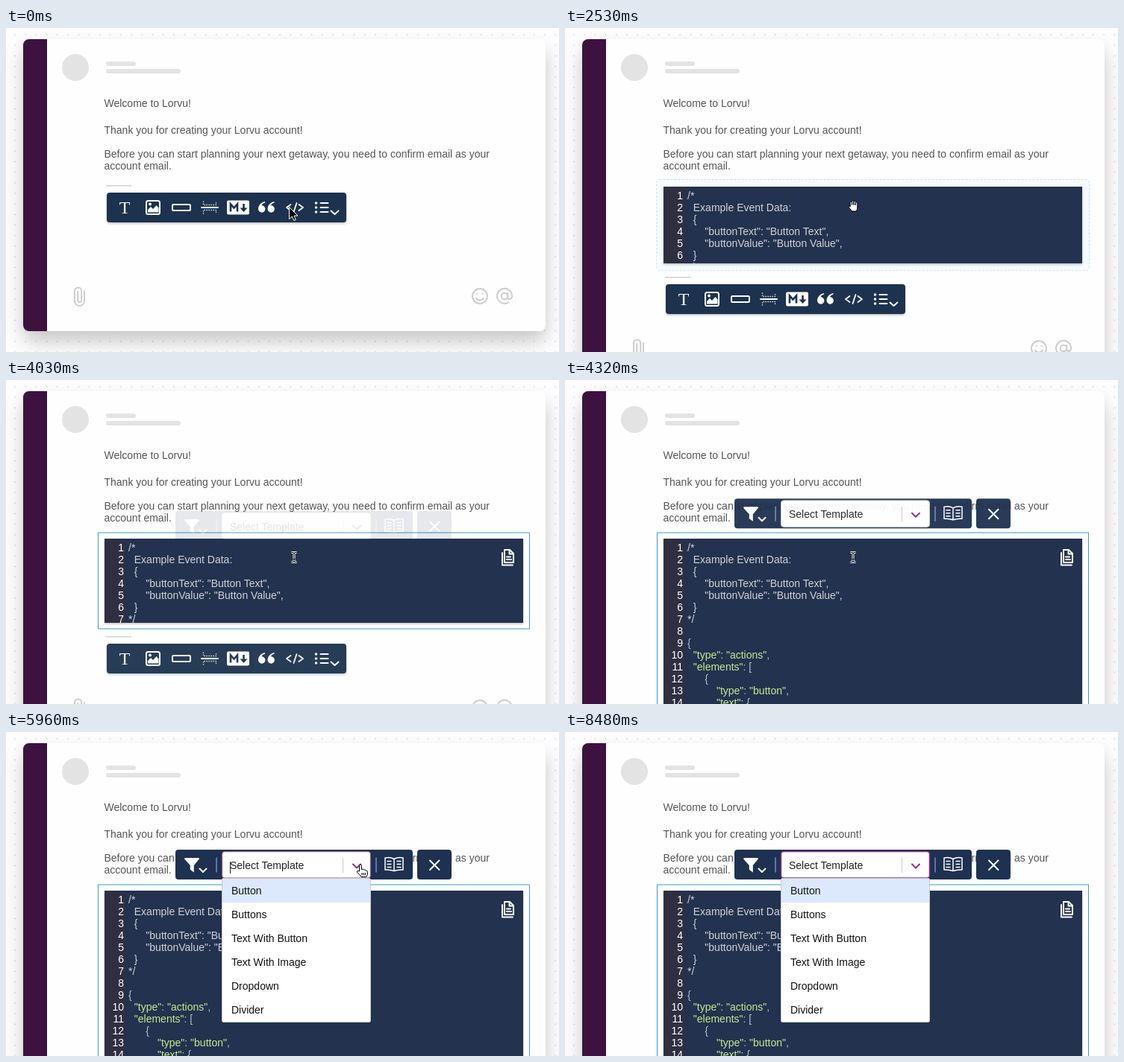
Animation, 741 px wide and 435 px high, one loop 8.75 s. Source, as an HTML page:

```html
<!DOCTYPE html>
<html lang="en">
<head>
<meta charset="utf-8">
<title>Message editor</title>
<style>
  html, body { margin: 0; width: 100%; height: 100%; overflow: hidden; background: #fdfdfd; }
  svg { display: block; width: 741px; height: 435px; }
  text { font: 14px "Liberation Sans", Arial, sans-serif; white-space: pre; }
  .line { fill: none; stroke: #fff; stroke-width: 2; stroke-linecap: round; stroke-linejoin: round; }
  .navy { fill: #1e3150; }
  .white { fill: #fff; }
  .muted { fill: none; stroke: #cdcdcd; stroke-width: 2; stroke-linecap: round; }
  .body { fill: #555; }
  .skeleton { fill: #e3e3e3; }
  .cursor { stroke: #000; fill: #fff; stroke-width: 1; stroke-linejoin: round; }
</style>
</head>
<body>
<svg viewBox="0 0 741 435">
  <defs>
    <pattern id="dots" width="14.2" height="14.2" patternUnits="userSpaceOnUse">
      <circle cx="12" cy="9" r=".9" fill="#d6d6d6"/>
    </pattern>
    <filter id="blur" x="-20%" y="-20%" width="140%" height="140%"><feGaussianBlur stdDeviation="13"/></filter>
    <filter id="soft" x="-10%" y="-20%" width="120%" height="150%">
      <feDropShadow dx="0" dy="1.5" stdDeviation="1.5" flood-opacity=".25"/>
    </filter>
    <clipPath id="codeClip"><rect id="codeClipBox" x="132" y="213" width="561"/></clipPath>
  </defs>

  <rect width="741" height="435" fill="#fdfdfd"/>
  <rect width="741" height="435" fill="url(#dots)"/>
  <g id="card">
    <rect x="23" y="29" width="700" rx="14" fill="#000" opacity=".21" filter="url(#blur)"/>
    <rect x="23" y="15" width="700" rx="8" fill="#fefefe"/>
    <rect x="23" y="15" width="42" rx="8" fill="#3d123f"/>
    <rect x="55" y="15" width="20" fill="#fefefe"/>
  </g>

  <g class="skeleton">
    <circle cx="93" cy="53" r="18"/>
    <rect x="134" y="45" width="40" height="6" rx="3"/>
    <rect x="134" y="55" width="100" height="6" rx="3"/>
  </g>
  <g class="body">
    <text x="131.500" y="106">Welcome to Lorvu!</text>
    <text x="131.500" y="142">Thank you for creating your Lorvu account!</text>
    <text x="131.500" y="174">Before you can start planning your next getaway, you need to confirm email as your</text>
    <text x="131.500" y="190">account email.</text>
  </g>

  <g id="footer" class="muted">
    <path d="M105 353V366.500a6.500 6.500 0 0 1-13 0V353a4.600 4.600 0 0 1 9.200 0V365.500a2.500 2.500 0 0 1-5 0V354"/>
    <circle cx="635" cy="360" r="10"/>
    <path d="M630 363q5 5.500 10 0M631.500 357h.1M638.500 357h.1"/>
    <circle cx="668" cy="360" r="4.300"/>
    <path d="M672.300 356V361.500q.4 2.600 2.900 2.400 3-.6 2.800-4.200a10 10 0 1 0-4.500 8.500"/>
  </g>

  <g id="block">
    <rect id="hoverBox" x="122.500" y="203.500" width="580" rx="4" fill="#f5fbff" stroke="#c5dcec" stroke-dasharray="3 2"/>
    <rect id="editBox" x="123.500" y="205" width="578" fill="#fff" stroke="#3b9bd3"/>
    <rect id="codeBox" x="132" y="213" width="561" fill="#24334f" filter="url(#soft)"/>
    <g clip-path="url(#codeClip)">
      <rect x="132" y="213" width="28" height="260" fill="#2e2f41"/>
      <g id="code"></g>
    </g>
    <g id="copyIcon" class="line">
      <path d="M668 228h7l5 5v12h-12zM674.500 228v5.500h5.500M665 232v16.500h14M671 237.500h5M671 241h6"/>
    </g>
  </g>

  <g id="tools">
    <rect x="134" y="211" width="34" height="1.500" fill="#d2d2d2"/>
    <rect class="navy" x="135" y="221" width="321" height="40" rx="4" filter="url(#soft)"/>
    <rect id="active" x="371" y="226" width="32" height="31" rx="4" fill="#55a070"/>
    <text x="159" y="249" text-anchor="middle" class="white" style="font:24px 'Liberation Serif',Times,serif">T</text>
    <rect class="line" x="188" y="232" width="18" height="18" rx="2.500"/>
    <path class="white" d="M190 247.500V244l4-4 3 3 4.500-5 3 3.500v6z"/>
    <circle class="white" cx="193" cy="236.500" r="2"/>
    <rect class="line" x="223" y="237" width="24" height="8" rx="1.500"/>
    <path class="line" d="M262 241h22"/>
    <path class="line" d="M264.500 232.500v5h17v-5M264.500 249.500v-5h17v5" style="stroke-width:1.300;stroke-dasharray:1.300 1.700;stroke-linecap:butt"/>
    <rect class="white" x="296" y="231.500" width="30" height="19" rx="2"/>
    <path d="M301 246.500v-10l4.500 5 4.500-5v10M318.500 236v8" fill="none" stroke="#1e3150" stroke-width="2.600"/>
    <path class="navy" d="M313.500 241.500h10l-5 5.500z"/>
    <g id="quotes" class="white">
      <path id="quote" d="M347 233c-5 1-9 5-9 10a4.700 4.700 0 1 0 4.300-4.700q1-2.800 4.700-3.800z"/>
      <use href="#quote" x="12.500"/>
    </g>
    <path class="line" d="M381.500 237l-5.500 4 5.500 4M392.500 237l5.500 4-5.500 4M389.500 235l-4 12" style="stroke-width:1.800"/>
    <path class="line" d="M421.500 235h10M421.500 241h10M421.500 247h10M435.500 245.500l5 4.500 5-4.500"/>
    <path class="line" d="M415.500 235h.1M415.500 241h.1M415.500 247h.1" style="stroke-width:3.400"/>
  </g>

  <g id="tip">
    <path class="navy" d="M323 182H451a4 4 0 0 1 4 4V207a4 4 0 0 1-4 4H394L387 218 380 211H323a4 4 0 0 1-4-4V186a4 4 0 0 1 4-4z"/>
    <text x="387" y="201" text-anchor="middle" class="white" style="font:500 13.800px 'Open Sans',sans-serif">New Jsonnet Block</text>
  </g>

  <g id="bar">
    <rect class="navy" x="227" y="158" width="318" height="40" rx="4"/>
    <rect class="navy" x="551" y="158" width="46" height="40" rx="4"/>
    <path class="white" d="M240 169h18q1.500.5.500 2l-6.700 8v9.500l-5-3.800V179l-7.300-8q-.7-1.500.5-2z"/>
    <path class="line" d="M259.500 183.500l4.500 4.500 4.500-4.500"/>
    <path d="M282 168.500v20M496 168.500v20" stroke="#6f8fc8" stroke-width="1.500"/>
    <rect id="select" x="289.500" y="160.500" width="199" height="35.500" rx="3.500" fill="#fff"/>
    <text x="300" y="184" fill="#222">Select Template</text>
    <path d="M451.500 169v20" stroke="#ccc"/>
    <path class="line" d="M465 177.500l5 5 5-5" style="stroke:#8f2d82"/>
    <path class="line" d="M520 170.500q-5-3-12-1.500v16q7-.5 12 1.500 5-2 12-1.500V169q-7-1.500-12 1.500v16M511 173.500h5M511 177.500h5M511 181.500h5M524 173.500h5M524 177.500h5M524 181.500h5" style="stroke-width:1.500"/>
    <path class="line" d="M568 172.500l12.500 12.500M580.500 172.500L568 185"/>
  </g>

  <g id="menu">
    <rect x="289.500" y="196.500" width="199" height="193" rx="2" fill="#fff" stroke="#c8c8c8"/>
    <rect x="290" y="197" width="198" height="32" fill="#dce8fc"/>
  </g>
  <path id="caret" d="M300.500 174v16" stroke="#222"/>

  <g id="pointer" class="cursor">
    <path id="arrow" stroke="#fff" style="fill:#000;stroke:#fff" d="M0 0V16L3.800 12.500 6.300 18 8.800 17 6.400 11.500H11.500Z"/>
    <path id="hand" d="M4 10V2.500a1.500 1.500 0 0 1 3 0V7.500q2.500-1.200 3 .6 2.200-.8 2.700.8 2.200-.3 2.200 2V13q0 2-1.500 4.500H6.500Q5 15 1.200 11.500 .2 9.300 2.500 9.300ZM7.500 12v3M9.700 12v3M11.900 12v3"/>
    <path id="palm" d="M3.200 9V3.400a1.200 1.200 0 0 1 2.400 0V6.500 2a1.200 1.200 0 0 1 2.400 0V6.500 2.400a1.200 1.200 0 0 1 2.400 0V7 4a1.200 1.200 0 0 1 2.400 0V10q0 2.500-1.600 5H5.600Q3 12 .8 9 1 7.200 3.200 9Z"/>
    <g id="beam" fill="none">
      <path id="beamShape" d="M-3.500-6.500H-2Q0-6.500 0-5 0-6.500 2-6.500H3.500M0-5V5M-3.500 6.500H-2Q0 6.500 0 5 0 6.500 2 6.500H3.500M-1.500 2.500h3" style="stroke:#fff;stroke-width:3;fill:none"/>
      <use href="#beamShape" style="display:none"/>
      <path d="M-3.500-6.500H-2Q0-6.500 0-5 0-6.500 2-6.500H3.500M0-5V5M-3.500 6.500H-2Q0 6.500 0 5 0 6.500 2 6.500H3.500M-1.500 2.500h3" fill="none"/>
    </g>
  </g>
</svg>
<script>
const LOOP = 8750;
const $ = id => document.getElementById(id);
const setAttrs = (node, attrs) => {
  for (const key in attrs) node.setAttribute(key, attrs[key]);
  return node;
};
const addText = (parent, text, attrs) => {
  const node = setAttrs(document.createElementNS('http://www.w3.org/2000/svg', 'text'), attrs);
  node.textContent = text;
  parent.append(node);
  return node;
};

const source = `/*
  Example Event Data:
  {
      "buttonText": "Button Text",
      "buttonValue": "Button Value",
  }
*/

{
  "type": "actions",
  "elements": [
      {
          "type": "button",
          "text": {`.split('\n');

source.forEach((line, i) => {
  const y = 230 + i * 16;
  addText($('code'), i + 1, { x: 158, y, 'text-anchor': 'end', fill: '#fff' });
  const node = addText($('code'), line, { x: 164, y, fill: i < 7 ? '#d3d3d3' : '#b3bfcb' });
  if (i > 8) node.innerHTML = line.replace(/"[^"]*"/g, '<tspan fill="#c8ea8c">$&</tspan>');
});

['Button', 'Buttons', 'Text With Button', 'Text With Image', 'Dropdown', 'Divider']
  .forEach((label, i) => addText($('menu'), label, { x: 302, y: 218 + i * 32, fill: '#111' }));

// Each entry changes part of the scene from its start time onwards.
const at = (kind, x, y) => ({ cursor: kind, x, y });
const timeline = [
  [0, { active: 0, tip: 0, tipY: 0, code: 0, hover: 0, edit: 0, bar: 0, barY: 0, menu: 0, focus: 0, caret: 0, ...at('arrow', 379.5, 240.5) }],
  [450, { active: .5, ...at('hand', 380.5, 237) }],
  [590, { active: 1 }],
  [890, { tip: .25, tipY: 4 }],
  [1040, { tip: .8, tipY: 1 }],
  [1180, { tip: 1, tipY: 0 }],
  [2530, { active: 0, tip: 0, code: 103, hover: .85, ...at('palm', 379, 231) }],
  [2680, { hover: 1 }],
  [4030, { code: 113, hover: 0, edit: 1, bar: .1, barY: 18, ...at('beam', 386, 238) }],
  [4180, { code: 250, bar: .6, barY: 7 }],
  [4320, { bar: .95, barY: 1.3 }],
  [4470, { bar: 1, barY: 0 }],
  [4620, at('beam', 397, 231)],
  [4760, at('arrow', 432, 207)],
  [4910, at('arrow', 462, 189)],
  [5060, at('arrow', 473, 182.5)],
  [5210, at('hand', 469.5, 177)],
  [5960, { menu: 1, focus: .6, caret: 1 }],
  [6100, { focus: 1 }],
  [6550, { caret: 0 }],
  [7000, { caret: 1, ...at('hand', 468.5, 172) }],
  [7150, at('hand', 469.5, 177)],
  [7450, { caret: 0 }],
  [8040, { caret: 1, ...at('arrow', 486, 194) }],
  [8190, at('arrow', 601, 302)],
  [8330, at('arrow', 727, 417)],
  [8480, { caret: 0, cursor: 'none' }]
];

function sceneAt(time) {
  const scene = {};
  for (const [start, change] of timeline) if (time >= start) Object.assign(scene, change);
  return scene;
}

const shift = (id, x, y) => $(id).setAttribute('transform', `translate(${x} ${y})`);
const fade = (id, opacity) => { $(id).style.opacity = opacity; };

function render(time) {
  const s = sceneAt(time);
  const toolShift = s.code && s.code + 20;
  const cardGrow = s.code && s.code - 33;

  for (const part of $('card').children) part.setAttribute('height', 392 + cardGrow);
  shift('footer', 0, cardGrow);
  shift('tools', 0, toolShift);
  for (const id of ['codeBox', 'codeClipBox']) $(id).setAttribute('height', s.code);
  $('hoverBox').setAttribute('height', s.code + 19);
  $('editBox').setAttribute('height', s.code + 16);

  fade('block', s.code ? 1 : 0);
  fade('hoverBox', s.hover);
  fade('editBox', s.edit);
  fade('copyIcon', s.edit);
  fade('tools', s.edit ? .95 : 1);
  fade('active', s.active);
  fade('tip', s.tip);
  shift('tip', 0, s.tipY);
  fade('bar', s.bar);
  shift('bar', 0, s.barY);
  fade('menu', s.menu);
  fade('caret', s.caret);
  setAttrs($('select'), {
    stroke: s.focus ? '#8f2d82' : '#ccc',
    'stroke-opacity': s.focus || 1,
    'stroke-width': s.focus ? 1.5 : 1
  });

  shift('pointer', s.x, s.y);
  for (const kind of ['arrow', 'hand', 'palm', 'beam']) fade(kind, s.cursor === kind ? 1 : 0);
}

const began = performance.now();
function tick() {
  render((performance.now() - began) % LOOP);
  requestAnimationFrame(tick);
}
tick();
</script>
</body>
</html>
```
